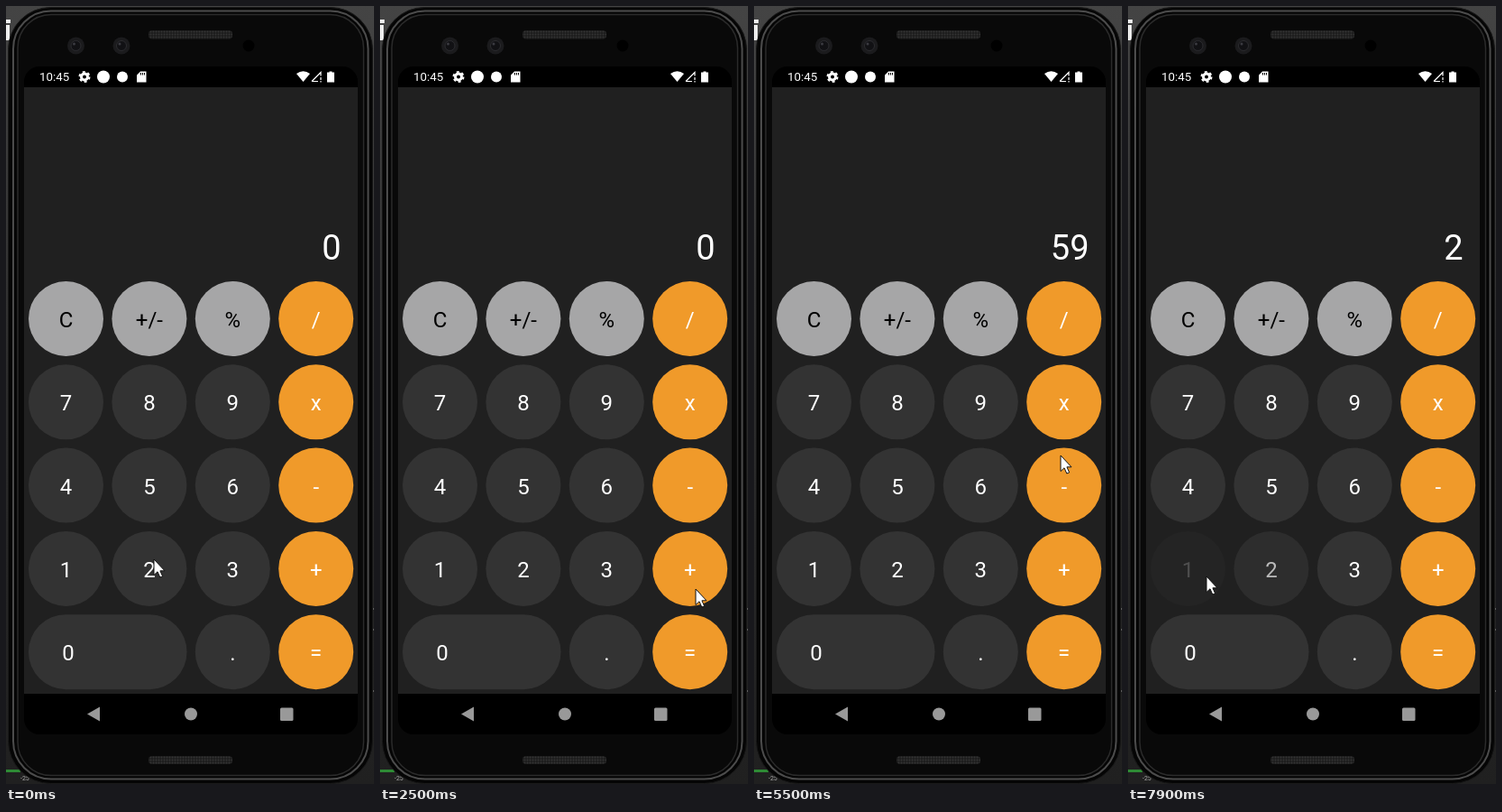
Write an HTML page that moves like this. It is 408x862 px and loops after 8 s.

```html
<!DOCTYPE html>
<html lang="en">
<head>
<meta charset="utf-8">
<title>Calculator</title>
<style>
  html, body { margin: 0; width: 100%; height: 100%; overflow: hidden; background: #111; }
  svg { display: block; width: 408px; height: 862px; font-family: Roboto, Arial, sans-serif; }
</style>
</head>
<body>
<svg viewBox="0 0 408 862">
  <defs>
    <linearGradient id="desk" x2="0" y2="1">
      <stop offset="0" stop-color="#444"/><stop offset=".5" stop-color="#2c2c2c"/><stop offset="1" stop-color="#202020"/>
    </linearGradient>
    <pattern id="mesh" width="3" height="3" patternUnits="userSpaceOnUse">
      <rect width="3" height="3" fill="#1c1c1c"/><circle cx="1.5" cy="1.5" r="1" fill="#343434"/>
    </pattern>
  </defs>

  <!-- Desktop behind the phone -->
  <rect width="408" height="862" fill="url(#desk)"/>
  <path d="M0 15h5v4H0zM0 21h4v17H0z" fill="#eee"/>
  <path d="M0 847.500h16" stroke="#2e8b35" stroke-width="3"/>
  <text x="16" y="858" font-size="7" fill="#aaa">-25</text>
  <path d="M404 668h4M404 691h4M404 759h4" stroke="#999"/>

  <!-- Phone body -->
  <g fill="none">
    <rect x="2.500" y="1.500" width="404" height="860" rx="47" fill="#050505" stroke="#1a1a1a"/>
    <rect x="8" y="5.500" width="393.500" height="851" rx="42" stroke="#4c4c4c" stroke-width="2"/>
    <rect x="13" y="9.500" width="383.500" height="843" rx="37" fill="#090909" stroke="#2b2b2b" stroke-width="1.500"/>
  </g>
  <rect x="158" y="27" width="93" height="9.500" rx="4" fill="url(#mesh)"/>
  <rect x="158" y="831" width="93" height="9" rx="4" fill="url(#mesh)"/>
  <g id="lenses"></g>
  <circle cx="269" cy="44" r="6.500" fill="#000"/>

  <!-- Screen -->
  <rect x="20" y="67" width="370" height="740" rx="17"/>
  <rect x="20" y="90" width="370" height="672" fill="#202020"/>
  <g fill="#fff">
    <text x="37" y="83" font-size="13.300">10:45</text>
    <circle cx="87" cy="78.500" r="3.500" fill="none" stroke="#fff" stroke-width="3"/>
    <circle cx="87" cy="78.500" r="5.500" fill="none" stroke="#fff" stroke-width="2" stroke-dasharray="2.880"/>
    <circle cx="108" cy="78.500" r="7"/>
    <circle cx="129" cy="78.500" r="6"/>
    <path d="M149 72.500h6.500v12h-10.500v-8z"/>
    <path d="M149.500 74v2.500M151.500 74v2.500M153.500 74v2.500" stroke="#000"/>
    <path d="M322 75q7.500-5.500 15 0l-7.500 9z"/>
    <path d="M339 83.500l10-10v4M339 83.500h7M349 79v3M349 83v1.500" fill="none" stroke="#fff" stroke-width="1.200"/>
    <path d="M358.500 72.500h3v1h2.500v11h-8v-11h2.500z"/>
  </g>
  <g fill="#999">
    <path d="M90 784.500l14-8v16z"/>
    <circle cx="205" cy="784.500" r="7"/>
    <rect x="304" y="777.500" width="14.500" height="14.500" rx="1.500"/>
  </g>
  <text id="display" x="371.500" y="280.500" font-size="38" fill="#fff" text-anchor="end">0</text>
  <g id="keys" font-size="24" text-anchor="middle"></g>
  <path id="cursor" d="M0 0V17.500l4-3.700 2.800 6.200 2.800-1.200-2.700-6H12z" fill="#fff" stroke="#111"/>
</svg>

<script>
const LOOP = 8000, FRAME = 100, FADE_IN = 150, FADE_OUT = 250;
const $ = id => document.getElementById(id);
const ease = x => x < .5 ? 2 * x * x : 1 - 2 * (1 - x) ** 2;
const clamp = x => Math.max(0, Math.min(1, x));

function add(parent, tag, attrs, text = '') {
  const el = document.createElementNS('http://www.w3.org/2000/svg', tag);
  for (const name in attrs) el.setAttribute(name, attrs[name]);
  el.textContent = text;
  return parent.appendChild(el);
}

for (const x of [77.5, 128]) {
  add($('lenses'), 'circle', { cx: x, cy: 44, r: 9.5, fill: '#1b1b1d' });
  add($('lenses'), 'circle', { cx: x, cy: 44, r: 5.5, fill: '#111114', stroke: '#2c2c30' });
  add($('lenses'), 'circle', { cx: x - 2, cy: 42, r: 1.5, fill: '#3a3a40' });
}

const rows = [['C', '+/-', '%', '/'], [7, 8, 9, 'x'], [4, 5, 6, '-'], [1, 2, 3, '+'], [0, null, '.', '=']];
const keys = {};
rows.forEach((row, r) => row.forEach((label, c) => {
  if (label === null) return;
  const x = 25 + c * 92.4, y = 305 + r * 92.3, zero = label === 0;
  const fill = c === 3 ? '#f09a2a' : r ? '#333' : '#a6a6a7';
  const g = keys[label] = add($('keys'), 'g', {});
  add(g, 'rect', { x, y, width: zero ? 175.5 : 83, height: 83, rx: 41.5, fill });
  add(g, 'text', { x: zero ? 69 : x + 41.5, y: y + 51, fill: r || c === 3 ? '#fff' : '#000' }, label);
}));

// [key, time pressed, display after release]
const presses = [
  ['2', 100, '2'], ['3', 550, '23'], ['+', 2100, '0'], ['3', 3720, '3'], ['6', 4250, '36'],
  ['=', 4700, '59'], ['-', 6350, '0'], ['2', 7610, '2'], ['1', 7760, '21']
];

// [time, x, y] of the pointer tip
const path = [
  [0, 164, 613], [250, 166, 615], [500, 248, 625], [700, 252, 627], [950, 335, 695], [1400, 346, 664],
  [1900, 346, 664], [2100, 350, 646], [3200, 350, 646], [3600, 256, 628], [3900, 254, 626],
  [4150, 256, 540], [4300, 258, 542], [4500, 333, 709], [5000, 335, 710], [5400, 341, 502],
  [5500, 340, 498], [6200, 341, 520], [6500, 341, 522], [6900, 142, 558], [7100, 98, 605],
  [7400, 158, 617], [7650, 156, 620], [7800, 90, 631], [7900, 87, 632], [8000, 87, 632]
];

function draw(t) {
  let shown = '0';
  for (const label in keys) keys[label].setAttribute('opacity', 1);
  for (const [label, down, result] of presses) {
    const age = t - down;
    if (age >= FADE_IN + 40) shown = result;
    if (age < 0 || age > FADE_IN + FADE_OUT) continue;
    const dim = ease(clamp(age / FADE_IN)) - ease(clamp((age - FADE_IN) / FADE_OUT));
    keys[label].setAttribute('opacity', 1 - .8 * dim);
  }
  $('display').textContent = shown;

  const i = path.findIndex(p => p[0] > t);
  const [t0, x0, y0] = path[i - 1], [t1, x1, y1] = path[i];
  const k = ease((t - t0) / (t1 - t0));
  $('cursor').setAttribute('transform', `translate(${x0 + (x1 - x0) * k} ${y0 + (y1 - y0) * k})`);
}

const start = performance.now();
function tick() {
  const t = (performance.now() - start) % LOOP;
  draw(Math.floor(t / FRAME) * FRAME);
  requestAnimationFrame(tick);
}
tick();
</script>
</body>
</html>
```
